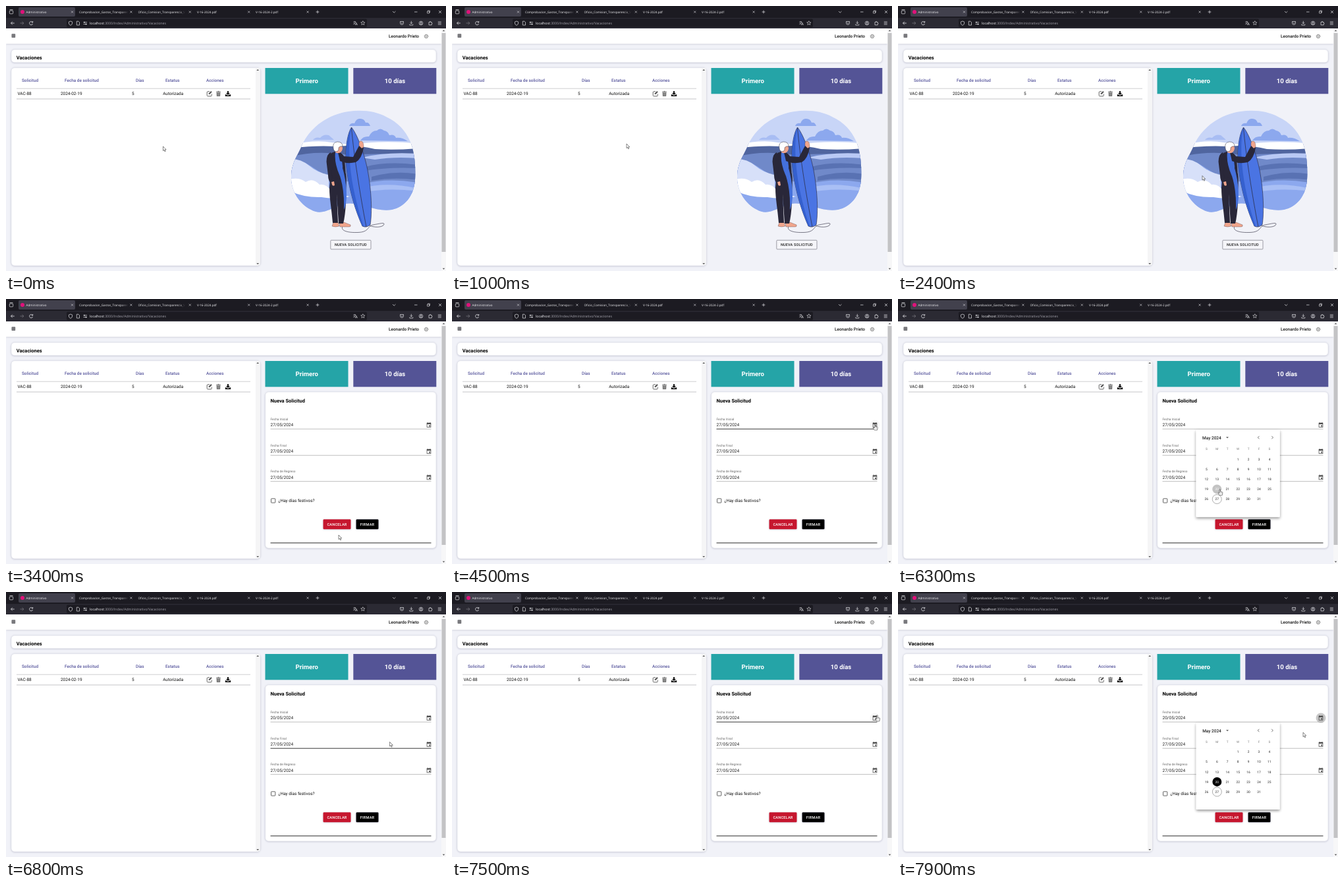
An HTML page that plays this animation: 668x402 px, repeating every 8000 ms.

```html
<!DOCTYPE html>
<html lang="es">
<head>
<meta charset="utf-8">
<title>Vacaciones</title>
<style>
html, body { margin: 0; width: 100%; height: 100%; overflow: hidden; background: #f1f2f8; }
svg { display: block; width: 668px; height: 402px; font-family: Roboto, sans-serif; text-rendering: geometricPrecision; }
.ui { font-family: "Open Sans", sans-serif; }
.m { font-weight: 500; }
.b { font-weight: 700; }
</style>
</head>
<body>
<svg id="stage" viewBox="0 0 668 402" xmlns="http://www.w3.org/2000/svg"></svg>
<script>
const LOOP = 8000;
const stage = document.getElementById('stage');

// Markup helpers
const text = (x, y, s, size, fill = '#111', attrs = '') =>
  `<text x="${x}" y="${y}" font-size="${size}" fill="${fill}" ${attrs}>${s}</text>`;
const rect = (x, y, w, h, fill, r = 0, attrs = '') =>
  `<rect x="${x}" y="${y}" width="${w}" height="${h}" rx="${r}" fill="${fill}" ${attrs}/>`;
const shape = (d, fill, attrs = '') => `<path d="${d}" fill="${fill}" ${attrs}/>`;
const line = (d, stroke, w = .7, attrs = '') =>
  `<path d="${d}" fill="none" stroke="${stroke}" stroke-width="${w}" ${attrs}/>`;
const circle = (x, y, r, fill, attrs = '') => `<circle cx="${x}" cy="${y}" r="${r}" fill="${fill}" ${attrs}/>`;
const group = (attrs, s) => `<g ${attrs}>${s}</g>`;
const card = (x, y, w, h) => rect(x, y, w, h, '#fff', 5, 'stroke="#dcdde8" stroke-width=".6" filter="url(#soft)"');
const MID = 'text-anchor="middle"';

const defs = `<defs>
  <filter id="soft" x="-5%" y="-20%" width="110%" height="150%"><feDropShadow dx="0" dy=".5" stdDeviation="1.1" flood-color="#55557a" flood-opacity=".35"/></filter>
  <filter id="lift" x="-10%" y="-10%" width="120%" height="125%"><feDropShadow dx="0" dy="2" stdDeviation="2.2" flood-opacity=".42"/></filter>
  <linearGradient id="fade"><stop offset=".86" stop-color="#fff"/><stop offset="1" stop-color="#000"/></linearGradient>
  <mask id="tabFade" maskContentUnits="objectBoundingBox"><rect width="1" height="1" fill="url(#fade)"/></mask>
  <clipPath id="blob"><path d="M520 160C542 157 562 160 577 168C596 177 606 189 613 204C621 222 622 244 621 264C619 289 605 305 586 309C560 314 536 294 512 301C494 306 480 319 463 309C445 300 433 281 433 259C433 239 443 226 449 212C458 191 481 166 520 160Z"/></clipPath>
</defs>`;

function browser() {
  const fg = '#e6e6ea';
  let s = rect(0, 0, 668, 18, '#1c1b22') + rect(0, 18, 668, 16, '#2b2a33');
  s += rect(19, 2, 86, 14, '#42414d', 2) + rect(92, 19.5, 456, 12.7, '#1c1b22', 2);
  s += circle(25, 9, 3, '#e0127a');
  s += rect(5.3, 7, 5.4, 4.8, 'none', 1, `stroke="${fg}" stroke-width=".7"`) + line('M5.5 5.6H10.5', fg);
  const tabs = [[30.5, 'Administrativo'], [111, 'Comprobacion_Gastos_Transparen', 1],
    [200.5, 'Oficio_Comision_Transparencia_V', 1], [290, 'V-16-2024.pdf'], [379, 'V-16-2024-2.pdf']];
  tabs.forEach(([x, name, cut], i) => {
    s += text(x, 10.7, name, 4.6, '#f4f4f6', 'class="ui"' + (cut ? ' mask="url(#tabFade)"' : ''));
    const c = 100.5 + 89.4 * i;
    s += line(`M${c - 1.5} 7.5l3 3m0-3l-3 3`, fg, .6);
  });
  s += line('M473 6.6v4.8M470.6 9h4.8M587 8l2.2 2.2L591.400 8M620 9h4.500M657 7l4 4m0-4l-4 4', fg, .7);
  s += line('M639.500 8h3v3h-3zM640.500 8V7h3v3h-1', fg, .6);
  s += line('M12.800 26H7.500m2.300-2.300L7.500 26l2.300 2.300', fg, .8);
  s += line('M21.500 26h5.300m-2.300-2.300L26.800 26l-2.300 2.300', '#75747c', .8);
  s += line('M40.300 24.600a2.600 2.600 0 1 0 .3 2.400M40.700 23v2h-2', fg, .8);
  s += line('M98 23l2.600 1v1.800c0 1.800-1 2.800-2.600 3.500c-1.600-.7-2.600-1.700-2.600-3.500V24z', fg, .7);
  s += line('M107.300 23.200h2.700l1.500 1.500v4.300h-4.200z', fg, .7);
  s += line('M117.500 24.700h5.500M117.500 27.500h5.500', fg, .7) + circle(119, 24.700, .9, fg) + circle(121.500, 27.500, .9, fg);
  s += text(127, 27.9, 'localhost<tspan fill="#a5a4ad">:3000/Index/Administrativo/Vacaciones</tspan>', 5.2, '#fbfbfe', 'class="ui"');
  s += line('M527.300 24h4M529.300 23v1M530.700 24c-.5 2-1.700 3-3.400 3.700M528 25.300c.6 1.200 1.300 1.700 2 2M530.300 29l1.600-3.700 1.600 3.700M531 28h1.900', fg, .6);
  s += line('M541.800 22.700l.9 2 2.200.2-1.700 1.500.5 2.200-1.900-1.200-1.900 1.200.5-2.200-1.700-1.500 2.200-.2z', fg, .6);
  s += line('M598.500 23.500h5v2.300a2.500 2.500 0 0 1-5 0zM599.700 25.300l1.300 1.200 1.300-1.200', fg, .7);
  s += line('M615.300 22.800v4m-1.800-1.700l1.800 1.700 1.800-1.700M612.800 27.500v1.500h5v-1.500', fg, .7);
  s += circle(630, 26, 2.800, 'none', `stroke="${fg}" stroke-width=".7"`) + circle(630, 25.200, .9, fg) + line('M628.200 28a2 2 0 0 1 3.600 0', fg);
  s += line('M642 24.500h1.400c-.5-1.600 1.800-1.600 1.300 0h1.500v1.500c1.300-.4 1.300 1.600 0 1.200v1.600h-4.200z', fg, .7);
  s += line('M655.800 24h5M655.800 26h5M655.800 28h5', fg, .7);
  return s;
}

function page() {
  let s = rect(0, 34, 668, 368, '#f1f2f8');
  s += rect(0, 34, 661, 23.300, '#fff', 0, 'filter="url(#soft)"');
  s += rect(8.500, 42.300, 5.700, 5.700, '#6d6d72', .8) + line('M8.700 43.800h5.300M8.700 45.200h5.300M8.700 46.600h5.300', '#aaa', .3);
  s += text(627, 48.2, 'Leonardo Prieto', 6.45, '#111', 'class="m" text-anchor="end"');
  s += circle(638, 46, 2.300, 'none', 'stroke="#777" stroke-width=".8"') + circle(638, 46, .8, 'none', 'stroke="#777" stroke-width=".5"') +
    circle(638, 46, 2.900, 'none', 'stroke="#777" stroke-width=".8" stroke-dasharray="1.2 1.080"');
  s += rect(661, 34, 7, 368, '#f7f7f8') + rect(661.500, 41, 6, 332, '#c3c3c5');
  s += shape('M662.700 38.300l1.800-2 1.800 2z', '#555') + shape('M662.700 397.800l1.800 2 1.800-2z', '#555');
  s += card(8, 66, 645, 19.700) + text(15.700, 80.7, 'Vacaciones', 7.5, '#000', 'class="b"');
  s += card(8, 93.700, 378, 300.300);
  s += rect(379, 94.200, 6.500, 299, '#f5f5f6') + shape('M380.300 98l1.900-2 1.900 2z', '#555') + shape('M380.300 390l1.900 2 1.900-2z', '#555');
  [[24, 'Solicitud'], [89, 'Fecha de solicitud'], [197, 'Días'], [242, 'Estatus'], [304, 'Acciones']]
    .forEach(([x, n]) => s += text(x, 115.4, n, 6.4, '#56559c', 'class="m"'));
  [[17.500, 'VAC-88'], [83, '2024-02-19'], [191, '5'], [238.200, 'Autorizada']]
    .forEach(([x, n]) => s += text(x, 135.2, n, 6.45));
  s += line('M16 125.200H371', '#c2c2c6', .8) + line('M16 141H371', '#b5b5ba', .8);
  s += line('M309 129.700h-2.500q-1.300 0-1.300 1.300v4.500q0 1.300 1.300 1.300h4.500q1.300 0 1.300-1.300v-2', '#555', .9) +
    shape('M308 132.300l3.200-3.200 1.500 1.500-3.200 3.200-1.800.3z', '#555');
  s += line('M319 130.200h7M321.300 129.400h2.400', '#666', .9) + shape('M319.500 131.300h6l-.4 5.700h-5.200z', '#777') +
    line('M321.300 132.300v3.700M322.500 132.300v3.700M323.700 132.300v3.700', '#bbb', .3);
  s += shape('M336 129h2v3h2l-3 3-3-3h2z', '#111') + shape('M332.800 134.300h2l2.200 1.600 2.200-1.600h2v2.700h-8.400z', '#111');
  s += rect(393.500, 94, 126, 39.300, '#25a4a7') + rect(527.300, 94, 126, 39.300, '#545496');
  s += text(456.700, 117, 'Primero', 9.6, '#fff', `class="b" ${MID}`) + text(590.500, 117, '10 días', 9.6, '#fff', `class="b" ${MID}`);
  return s;
}

function surfer() {
  const dark = '#292739', skin = '#f0a58c';
  const scene = rect(430, 155, 195, 165, '#c8d5f7') +
    shape('M521 182q2-5 8-4q3-8 9-7q6 0 8 6q5-1 7 5z', '#8ca8ee') +
    shape('M538 204q4-7 13-6q4-9 12-9q5-5 11 0q6 1 8 7q8-2 10 4q9-1 18 5z', '#8ca8ee') +
    shape('M466 203q4-5 11-3q5-6 13-4l8 7z', '#a8bdf3') +
    shape('M430 210Q470 205 500 210T560 211T625 209V270H430Z', '#50659f') +
    shape('M430 211Q470 202 494 207L520 210Q580 203 625 209V216Q590 219 560 217Q530 210 500 213Q470 211 430 216Z', '#fff') +
    shape('M430 229Q470 218 520 226Q580 222 625 227V285H430Z', '#7089c9') +
    shape('M540 230Q575 221 625 224V231Q590 228 560 233Z', '#b9c9f5') +
    shape('M545 244Q580 235 625 241V246Q580 244 545 250ZM555 259Q590 249 625 255V264Q590 259 555 265Z', '#5972b3') +
    shape('M430 232Q450 234 463 243T495 262L540 270Q580 260 625 268V320H430Z', '#8ca8ee') +
    shape('M430 232Q447 231 460 242T490 256V283H430Z', '#d7e0f9') +
    shape('M430 263Q445 259 455 267Q466 260 476 271Q486 269 494 281Q510 287 522 289Q500 294 479 290Q452 291 430 280Z', '#fff') +
    shape('M540 276Q580 266 625 277V281Q580 275 540 283Z', '#a9bff5');
  let s = group('clip-path="url(#blob)"', scene);
  s += line('M511 334C507 342 522 344 534 343.500C552 343 548 334 557 332C569 330 574 328 574 331C573 336 558 337 550 332', dark, .6);
  // Board
  s += shape('M524.500 184C532 193 543 219 549 249C555 281 556 313 553 332Q547 337 541 334C530 309 521 280 517 246C514 219 518 194 524.500 184Z', '#4a74e3', `stroke="${dark}" stroke-width=".6"`);
  s += shape('M524.500 185C521 197 520 220 523 247C526 277 535 311 543 334L541 334C530 309 521 280 517 246C514 219 518 194 524.500 185Z', '#3560ce');
  s += line('M524.500 185C528 226 538 289 547 335', dark, .7);
  // Legs, torso and arms
  s += shape('M497 328h7l2 6q-6 2-11 0zM506 328h7l10 4q1 3-2 3h-14z', skin, `stroke="${dark}" stroke-width=".3"`);
  s += shape('M493 253L516 254C518 270 515 284 516 298Q515 318 512 330H505L502 285L504 329H496C494 305 491 292 491 276Z', dark);
  s += shape('M499 221C506 221 512 224 514 231L516 259Q503 264 492 258L489 235Q489 223 499 221Z', dark);
  s += shape('M503 222Q512 233 511 246Q517 266 517 290Q516 303 513 309Q514 280 507 258Q498 238 500 222Z', '#4470dc');
  s += shape('M493 222Q487 224 486.500 236L489 257Q489 265 494 270L498 268L494 254L498 235Z', dark);
  s += shape('M494 267l4-1 1 6q-3 2-4-1z', skin);
  s += shape('M504 222Q509 222 513 228L527 229L536 212L543 215Q540 232 531 237Q518 240 507 235Z', dark);
  s += shape('M536 212Q535 206 538 205Q543 204 543 214L540 216Z', skin, `stroke="${dark}" stroke-width=".3"`);
  // Head
  s += shape('M500 215h7l2 6q-4 4-9 1z', skin) + shape('M503 211q8-1 8 5q-1 6-5 6q-4-2-5-8z', skin);
  s += shape('M497 216Q495 207 503 206Q511 206 511 213Q507 212 505 215Q506 220 501 221Q497 220 497 216Z', '#fff', `stroke="${dark}" stroke-width=".5"`);
  s += rect(492.800, 355.300, 61.200, 13.700, '#f5f5f9', 1, 'id="newBtn" stroke="#777783" stroke-width=".7"');
  s += text(523.400, 364.2, 'NUEVA SOLICITUD', 5.55, '#222', `class="m" letter-spacing=".16" ${MID}`);
  return s;
}

const ROWS = [191, 231, 270.500];
const todayIcon = (x, y) =>
  shape(`M${x - 3.300} ${y - 3.200}h6.600v7h-6.600zm.8 2.200v4h5v-4zM${x - 2.300} ${y - 4}h1v1h-1zM${x + 1.300} ${y - 4}h1v1h-1z`, '#4c4c4c', 'fill-rule="evenodd"') +
  rect(x + .100, y + .500, 1.900, 1.900, '#4c4c4c');

function form() {
  let s = card(393.700, 141, 259.300, 237);
  s += text(401.500, 156.5, 'Nueva Solicitud', 7.45, '#000', 'class="b"');
  s += circle(642, 191, 7.500, '#000', 'id="ripple"');
  ['Fecha Inicial', 'Fecha Final', 'Fecha de Regreso'].forEach((name, i) => {
    const y = ROWS[i];
    s += text(401.500, y - 7.3, name, 4.8, '#666');
    s += text(401.500, y + 2.3, '27/05/2024', 6.5, '#222', i ? '' : 'id="date"');
    s += line(`M401.500 ${y + 6.200}H645.500`, '#929292', .6, `id="under${i}"`) + todayIcon(642, y);
  });
  s += rect(402.500, 302.800, 6.300, 6.300, '#fff', .6, 'stroke="#555" stroke-width=".9"');
  s += text(413.500, 308.2, '¿Hay días festivos?', 6.45);
  s += rect(481.500, 334.300, 42, 15, '#c6162f', 1.400, 'filter="url(#soft)"') + rect(531.500, 334.300, 34, 15, '#000', 1.400, 'filter="url(#soft)"');
  s += text(502.500, 343.8, 'CANCELAR', 5.65, '#fff', `class="m" letter-spacing=".16" ${MID}`);
  s += text(548.600, 343.8, 'FIRMAR', 5.65, '#fff', `class="m" letter-spacing=".16" ${MID}`);
  return s + line('M401.500 370H645.500', '#111', .9);
}

const dayPos = d => {
  const n = d + 2;
  return [468.300 + 15.950 * (n % 7), 242.800 + 15.200 * Math.floor(n / 7)];
};

function calendar() {
  let s = rect(452.500, 198.300, 127.300, 132.500, '#fff', 1.500, 'filter="url(#lift)"');
  s += text(462, 212.6, 'May 2024', 6.5, '#222', 'class="m"');
  s += shape('M498 209.200h4l-2 2z', '#555') + line('M548.500 207.900l-2.200 2.200 2.200 2.200M567.300 207.900l2.200 2.200-2.200 2.200', '#555', .8);
  [...'SMTWTFS'].forEach((c, i) => s += text(468.300 + 15.950 * i, 229, c, 4.7, '#777', MID));
  s += circle(0, 0, 7, '#000', 'id="hover" opacity=".08"');
  for (const d of [20, 27]) {
    const [x, y] = dayPos(d);
    s += circle(x, y, 7, '#000', `id="pick${d}"`);
  }
  for (let d = 1; d <= 31; d++) {
    const [x, y] = dayPos(d);
    s += text(x, y + 1.8, d, 4.9, '#222', `id="day${d}" ${MID}`);
  }
  return s;
}

const arrow = shape('M0 0V6.600L1.500 5.300L2.600 7.800L3.700 7.300L2.600 4.900H4.700Z', '#fff', 'stroke="#222" stroke-width=".55"');
const hand = shape('M-.7.300Q0-.600.700.300V3.400L3.500 4Q4.300 4.300 4.200 5.200L3.500 8.900H-.600L-2.700 5.900Q-2.500 4.700-1.500 5.300L-.7 6Z', '#fff', 'stroke="#222" stroke-width=".55"') +
  line('M1.200 4.800v1.300M2.500 5v1.200', '#222', .4);

stage.innerHTML = defs + browser() + page() + group('id="art"', surfer()) + group('id="form"', form()) +
  group('id="cal"', calendar()) + group('id="arrow"', arrow) + group('id="hand"', hand);

const $ = {};
stage.querySelectorAll('[id]').forEach(e => $[e.id] = e);
const set = (e, attrs) => { for (const k in attrs) e.setAttribute(k, attrs[k]); };
const show = (e, on) => e.setAttribute('display', on ? 'inline' : 'none');
const clamp = v => Math.max(0, Math.min(1, v));
const span = (t, a, b) => clamp((t - a) / (b - a));
const smooth = p => p * p * (3 - 2 * p);
const out = p => 1 - (1 - p) ** 3;

// Pointer stops: time, x, y
const STOPS = [
  [0, 238.500, 213], [250, 238.500, 213], [500, 265, 206], [800, 265, 206], [1000, 265, 209], [1820, 265, 209],
  [2060, 258, 146], [2400, 462, 257.500], [2700, 493, 323], [3050, 505, 361], [3300, 505, 358], [3640, 505, 358],
  [4200, 656, 218], [4500, 642, 190], [4700, 642, 190], [5100, 599.800, 211.500], [5400, 560, 245], [6000, 488.700, 288.800],
  [6400, 488.700, 288.800], [7100, 643, 188], [7300, 643, 188], [7500, 645.500, 187], [7680, 644, 189], [7900, 615, 213], [8000, 604, 218]
];

function pointer(t) {
  let i = 1;
  while (i < STOPS.length - 1 && t > STOPS[i][0]) i++;
  const [a, x0, y0] = STOPS[i - 1], [b, x1, y1] = STOPS[i];
  const p = smooth(span(t, a, b));
  return [x0 + (x1 - x0) * p, y0 + (y1 - y0) * p];
}

const OPENS = [4650, 7700], SWAP = 3300, PICK = 6240, CLOSE = 6530;

function draw(t) {
  const [x, y] = pointer(t);
  const inForm = t >= SWAP;
  show($.art, !inForm);
  show($.form, inForm);

  const opened = t >= OPENS[1] ? OPENS[1] : OPENS[0];
  const grow = out(span(t, opened, opened + 260)) * (opened === OPENS[0] ? 1 - smooth(span(t, CLOSE, CLOSE + 180)) : 1);
  const isOpen = grow > 0;
  show($.cal, isOpen);
  set($.cal, {
    opacity: grow,
    transform: `translate(516 198.300) scale(${.75 + .25 * grow} ${.5625 + .4375 * grow}) translate(-516 -198.300)`
  });

  const picked = t >= PICK;
  const fill = smooth(span(t, PICK, PICK + 250));
  set($.pick20, { opacity: picked ? .1 + .9 * fill : 0 });
  set($.pick27, picked
    ? { fill: 'none', stroke: '#777', 'stroke-width': .6 }
    : { fill: '#000', stroke: 'none' });
  $.day20.setAttribute('fill', picked ? '#fff' : '#222');
  $.day27.setAttribute('fill', picked ? '#222' : '#fff');

  let over = 0;
  for (let d = 1; isOpen && d <= 31; d++) {
    const [cx, cy] = dayPos(d);
    if (Math.hypot(x - cx, y - cy) < 7) over = d;
  }
  show($.hover, over && !(over === 20 && picked));
  if (over) {
    const [cx, cy] = dayPos(over);
    set($.hover, { cx, cy });
  }

  $.date.textContent = (t >= 6400 ? '20' : '27') + '/05/2024';
  ROWS.forEach((ry, i) => {
    const hot = inForm && !isOpen && x > 401 && x < 650 && y > ry - 7 && y < ry + 7;
    set($['under' + i], { stroke: hot ? '#222' : '#929292', 'stroke-width': hot ? .9 : .6 });
  });

  const onIcon = inForm && ROWS.some(ry => Math.hypot(x - 642, y - ry) < 7);
  const onBtn = !inForm && x > 492.800 && x < 554 && y > 355.300 && y < 369;
  const wave = t >= opened ? .22 * (1 - span(t, opened + 230, opened + 420)) : 0;
  set($.ripple, { opacity: Math.max(wave, onIcon && y < 200 ? .03 : 0) });
  $.newBtn.setAttribute('fill', onBtn ? '#e6e7ed' : '#f5f5f9');

  const isHand = onIcon || onBtn || over > 0;
  show($.arrow, !isHand);
  show($.hand, isHand);
  set(isHand ? $.hand : $.arrow, { transform: `translate(${x} ${y})` });
}

const start = performance.now();
function tick() {
  draw((performance.now() - start) % LOOP);
  requestAnimationFrame(tick);
}
tick();
</script>
</body>
</html>
```
